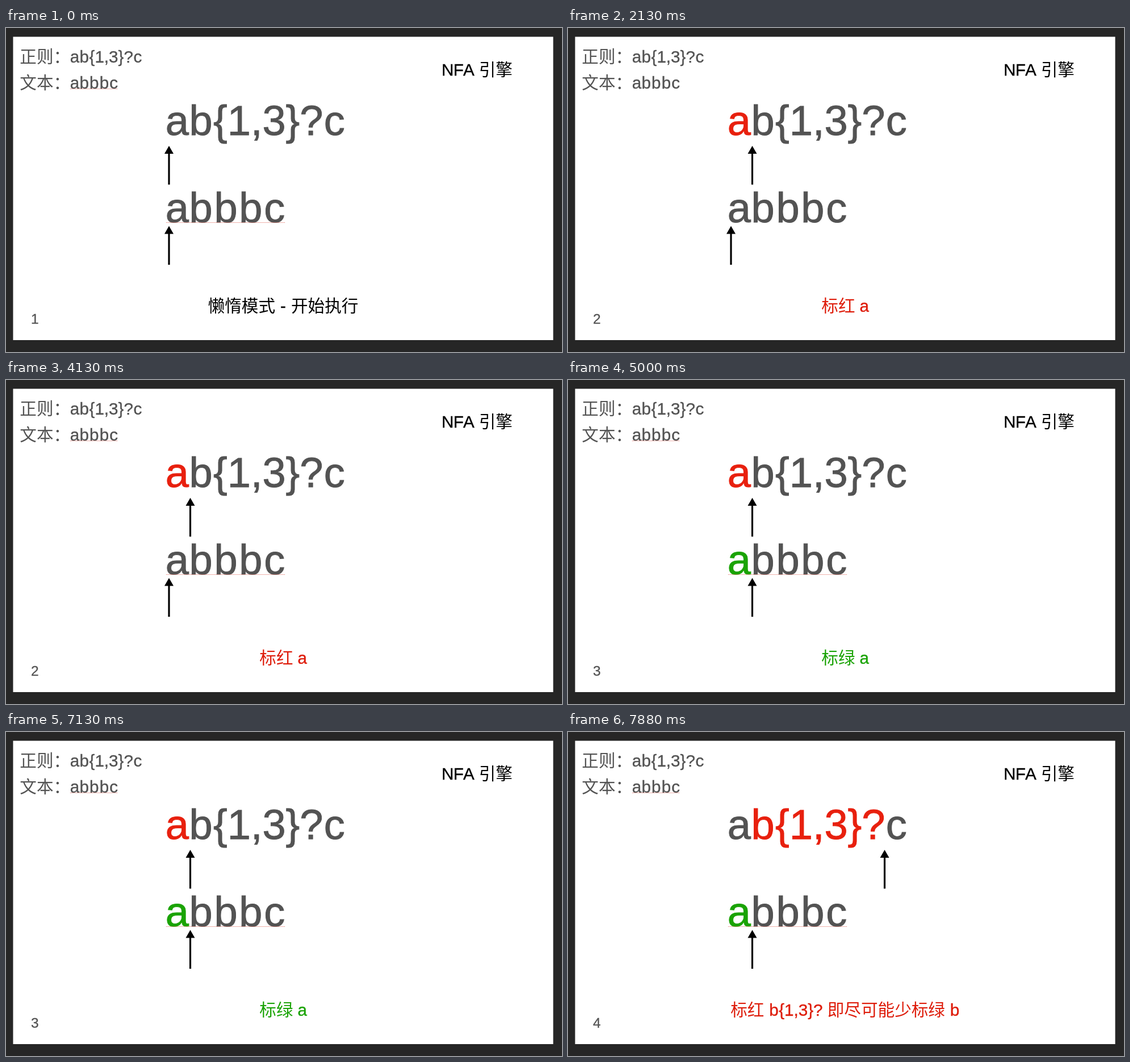
Write an HTML page that moves like this. It is 979 by 572 pixels and loops after 8 s.

```html
<!DOCTYPE html>
<html lang="zh-CN">
<head>
<meta charset="utf-8">
<style>
  html, body { margin: 0; width: 100%; height: 100%; overflow: hidden; background: #262626; }
  svg { display: block; }
  text { font-family: "Liberation Sans", "Noto Sans CJK SC", "Noto Sans CJK", sans-serif;
         text-anchor: middle; white-space: pre; }
</style>
</head>
<body>
<svg id="stage" width="979" height="572" viewBox="0 0 979 572"></svg>
<script>
const LOOP = 8000;
const GREY = '#535353', RED = '#e8200e', DARK_RED = '#de1c0a', GREEN = '#1aa305', BLACK = '#000';
const SMALL = 29.6, BIG = 74, PAGE = 24.5;
const PATTERN = 'ab{1,3}?c', SUBJECT = 'abbbc';

// Character advances in em; CJK characters take a full em.
const ADVANCE = {
  a: .537, b: .593, c: .537, '{': .333, '}': .333, ',': .278, '1': .556, '2': .556, '3': .556,
  '4': .556, '?': .556, ' ': .278, '-': .389, N: .722, F: .574, A: .648
};
const advance = ch => ADVANCE[ch] ?? 1;
const widthOf = (str, size) => [...str].reduce((sum, ch) => sum + advance(ch), 0) * size;

// Each glyph sits in the middle of its cell; Latin glyphs get a hairline of extra weight.
// marked: [first, end) range of characters drawn in markColor
function label(str, x, y, size, color, marked = [0, 0], markColor = color) {
  const spans = [...str].map((ch, i) => {
    const fill = i >= marked[0] && i < marked[1] ? markColor : color;
    const cell = advance(ch) * size;
    const weight = ch in ADVANCE ? ` stroke="${fill}"` : '';
    const span = `<tspan x="${(x + cell / 2).toFixed(2)}" fill="${fill}"${weight}>${ch}</tspan>`;
    x += cell;
    return span;
  });
  return `<text y="${y}" font-size="${size}" stroke-width="${size * .013}">${spans.join('')}</text>`;
}

const centered = (str, cx, y, size, color) =>
  label(str, cx - widthOf(str, size) / 2, y, size, color);

const arrow = (x, top) =>
  `<path d="M${x} ${top}l8 14h-6.4v54.6h-3.2v-54.6h-6.4z"/>`;

const spelling = (x1, x2, y) =>
  `<path d="M${x1} ${y}H${x2}" stroke="#e0685c" stroke-width="1" stroke-dasharray="1 1"/>`;

const slides = [
  { at: 0, underlineAt: 0, caption: '懒惰模式 - 开始执行', color: BLACK,
    red: [0, 0], green: [0, 0], arrows: [287, 287] },
  { at: 2130, underlineAt: 2500, caption: '标红 a', color: DARK_RED,
    red: [0, 1], green: [0, 0], arrows: [324.5, 287] },
  { at: 5000, underlineAt: 5000, caption: '标绿 a', color: GREEN,
    red: [0, 1], green: [0, 1], arrows: [324.5, 324.5] },
  { at: 7500, underlineAt: 7500, caption: '标红 b{1,3}? 即尽可能少标绿 b', color: DARK_RED,
    red: [1, 8], green: [0, 1], arrows: [557.5, 324.5] }
];

function draw(index, underlined) {
  const s = slides[index];
  return '<rect width="979" height="572" fill="#262626"/>' +
    '<rect x="12.5" y="15.5" width="951" height="535.5" fill="#fff"/>' +
    label('正则：' + PATTERN, 24.3, 60.5, SMALL, GREY) +
    label('文本：' + SUBJECT, 24.3, 106.5, SMALL, GREY) +
    label('NFA 引擎', 767, 83.5, SMALL, BLACK) +
    label(PATTERN, 281.5, 189, BIG, GREY, s.red, RED) +
    label(SUBJECT, 281.5, 343, BIG, GREY, s.green, GREEN) +
    (underlined ? spelling(113, 197, 107.5) + spelling(282, 492, 343.5) : '') +
    arrow(s.arrows[0], 208) + arrow(s.arrows[1], 349.5) +
    centered(s.caption, 488, 501, SMALL, s.color) +
    centered(String(index + 1), 50.8, 522, PAGE, GREY);
}

const stage = document.getElementById('stage');
const start = performance.now();
let shown = '';

function update(now) {
  const t = Math.max(0, now - start) % LOOP;
  const index = slides.findLastIndex(s => t >= s.at);
  const underlined = t >= slides[index].underlineAt;
  const state = index + '/' + underlined;
  if (state !== shown) {
    stage.innerHTML = draw(index, underlined);
    shown = state;
  }
  requestAnimationFrame(update);
}
update(start);
</script>
</body>
</html>
```
